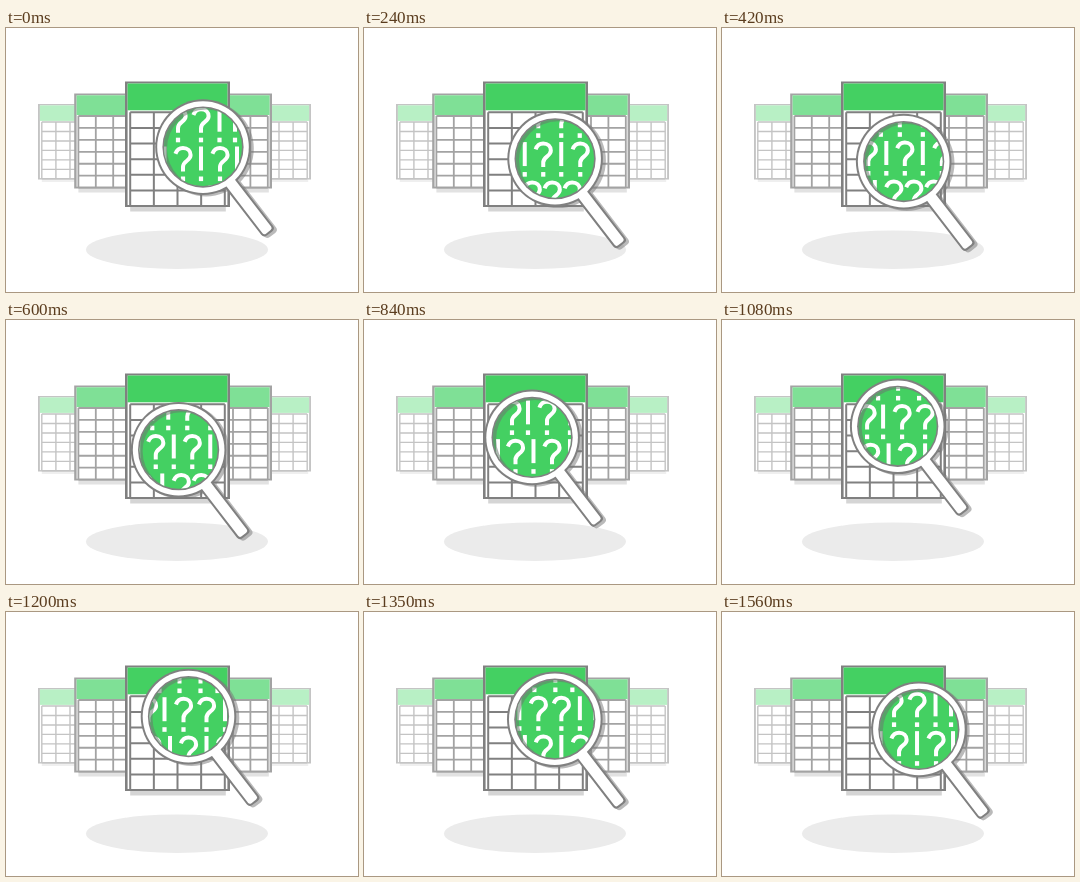
An HTML page that plays this animation: 352 px wide and 264 px high, repeating every 1.59 s.

```html
<!DOCTYPE html>
<html lang="en">
<head>
<meta charset="utf-8">
<title>Searching tables</title>
<style>
  html, body { margin: 0; width: 100%; height: 100%; overflow: hidden; background: #fff; }
  svg { display: block; width: 352px; height: 264px; }
</style>
</head>
<body>
<svg viewBox="0 0 352 264">
  <defs>
    <clipPath id="glass"><circle r="39"/></clipPath>
    <g id="mark-q">
      <path d="M-7.6 7.8C-6.2 3.9 -3.3 2 0 2C4.6 2 7.6 4.9 7.6 9C7.6 15 0 14.5 0 21V25.5" fill="none" stroke="#fff" stroke-width="4"/>
      <rect x="-2.1" y="30.5" width="4.2" height="4.6" fill="#fff"/>
    </g>
    <g id="mark-e" fill="#fff">
      <rect x="-2" y="0.5" width="4" height="24"/>
      <rect x="-2.1" y="30.5" width="4.2" height="4.6"/>
    </g>
    <g id="body">
      <circle r="47.8"/>
      <rect x="40" y="-7.4" width="69" height="14.8" rx="4" transform="rotate(52.4)"/>
    </g>
  </defs>
  <ellipse cx="171" cy="221.7" rx="91" ry="19.3" fill="#ebebeb"/>
  <g id="tables"></g>
  <g id="lens">
    <use href="#body" x="3" y="1.5" fill="#777" opacity=".5"/>
    <use href="#body" fill="#808080"/>
    <circle r="45.8" fill="#fff"/>
    <rect x="40" y="-5.4" width="67" height="10.8" rx="2.5" fill="#fff" transform="rotate(52.4)"/>
    <circle r="40.6" fill="#808080"/>
    <circle r="39" fill="#44d062"/>
    <g clip-path="url(#glass)">
      <g id="marks"></g>
      <path fill="#6b7a6f" fill-opacity=".55" fill-rule="evenodd"
        d="M-50-50H50V50H-50ZM-36 1.5a39 39 0 0 0 78 0a39 39 0 0 0 -78 0Z"/>
    </g>
  </g>
</svg>
<script>
const NS = 'http://www.w3.org/2000/svg';
const el = id => document.getElementById(id);

function add(parent, tag, attrs) {
  const node = document.createElementNS(NS, tag);
  for (const k in attrs) node.setAttribute(k, attrs[k]);
  parent.append(node);
}

// Outer frame with heavier sides, coloured header, 4 x 6 grid and a strip of shadow
function table({ x, y, w, h, head, top, pad, line, lw, side, fill, shade, drop }) {
  const g = el('tables');
  const box = (x, y, width, height, fill) => add(g, 'rect', { x, y, width, height, fill });
  box(x + pad, y + h, w - 2 * pad + 1, drop, shade);
  box(x, y, w, h, line);
  box(x + side, y + lw, w - 2 * side, h - 2 * lw, '#fff');
  box(x + side, y + lw, w - 2 * side, head, fill);
  const left = x + pad, right = x + w - pad, bottom = y + h - lw / 2;
  let d = '';
  for (let i = 0; i <= 4; i++) d += `M${left + (right - left) * i / 4} ${top}V${bottom}`;
  for (let i = 0; i <= 6; i++) d += `M${left} ${top + (bottom - top) * i / 6}H${right}`;
  add(g, 'path', { d, fill: 'none', stroke: line, 'stroke-width': lw });
}

const far = { y: 76, w: 64, h: 75.5, head: 15.5, top: 94, pad: 3.8, line: '#c4c4c4', lw: 1.4, side: 1.9, fill: '#b8f0c5', shade: '#efefef', drop: 2.5 };
const mid = { y: 65.5, w: 78, h: 95, head: 19.8, top: 88, pad: 4.2, line: '#a3a3a3', lw: 1.8, side: 2.4, fill: '#7fe096', shade: '#e2e2e2', drop: 4 };
const near = { y: 53.5, w: 105, h: 125.5, head: 26.8, top: 84.3, pad: 5.2, line: '#808080', lw: 2, side: 2.6, fill: '#44d062', shade: '#d5d5d5', drop: 4.5 };
table({ x: 32, ...far });
table({ x: 241, ...far });
table({ x: 68.2, ...mid });
table({ x: 188, ...mid });
table({ x: 119, ...near });

const rows = [
  [40.5, '!??!?', [148, 168, 189, 206, 224]],
  [79.2, '?!??!!', [137, 153, 172, 195, 213.5, 229]],
  [118, '!?!?!?!', [123, 140.5, 158.5, 177, 195, 214, 231]],
  [157, '?!????', [128, 147, 166, 186, 206, 226]]
];
for (const [y, text, xs] of rows)
  xs.forEach((x, i) => add(el('marks'), 'use', { href: text[i] === '?' ? '#mark-q' : '#mark-e', x, y }));

const LOOP = 1590, STEP = 30, R = 14.5, CX = 182.5, CY = 119.1, DRIFT = 0.38;

function draw(ms) {
  const t = Math.floor(ms % LOOP / STEP) * STEP;
  const turn = t / LOOP * 2 * Math.PI;
  const a = turn - 0.03 * (1 - Math.cos(turn));
  const x = CX + R * Math.cos(a), y = CY + R * Math.sin(a);
  // The magnified marks slide against the lens
  const mx = -x - DRIFT * (x - CX - R), my = -y - DRIFT * (y - CY);
  el('lens').setAttribute('transform', `translate(${x} ${y})`);
  el('marks').setAttribute('transform', `translate(${mx} ${my})`);
}

const start = performance.now();
function tick() {
  draw(performance.now() - start);
  requestAnimationFrame(tick);
}
tick();
</script>
</body>
</html>
```
